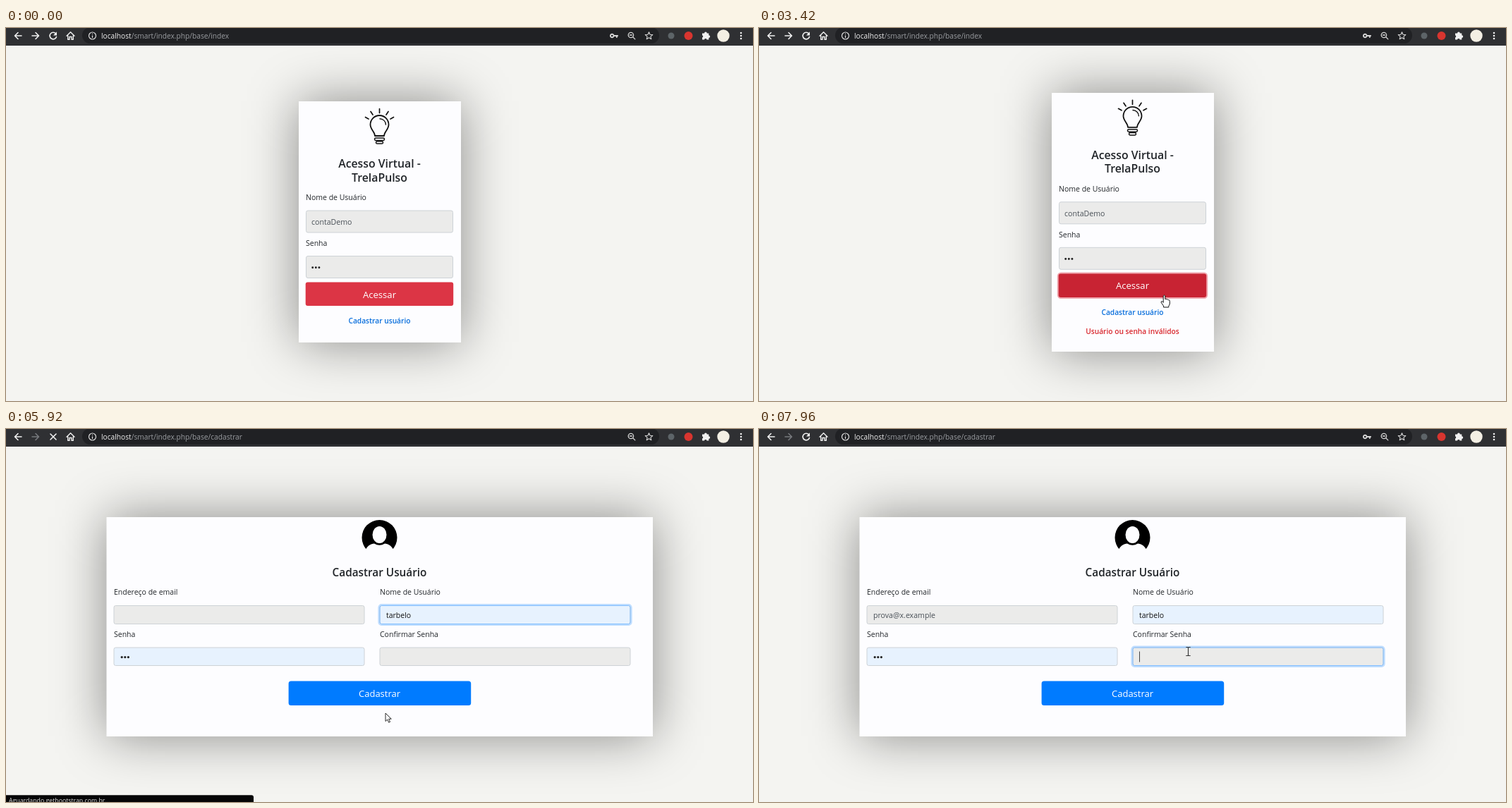
An HTML page for the animation above (8000 ms loop, 1059 by 529 pixels).

```html
<!DOCTYPE html>
<html lang="pt-BR">
<head>
<meta charset="utf-8">
<title>Acesso Virtual</title>
<style>
html, body { margin: 0; width: 100%; height: 100%; overflow: hidden; background: #f4f4f1; }
svg { display: block; width: 1059px; height: 529px; font-family: "Open Sans", "Noto Sans", sans-serif; }
.line { fill: none; stroke-linecap: round; stroke-linejoin: round; }
.bold { font-weight: 600; }
.mid { text-anchor: middle; }
</style>
</head>
<body>
<svg id="stage" viewBox="0 0 1059 529"></svg>
<script>
const LOOP = 8000;
const CLICK_LOGIN = 2830, ERROR = 3250, CLICK_LINK = 4500, NAVIGATE = 4800,
      LOADED = 5850, IDLE = 6050, CLICK_EMAIL = 6380, TYPE = 6620, CLICK_CONFIRM = 7790;
const EMAIL = 'prova@x.example';

// [time, x, y] of the pointer's hot spot
const PATH = [
  [60, 1000, 14], [840, 612, 352], [1000, 580, 374], [1130, 576, 376], [2700, 574.5, 379],
  [3480, 574.5, 379], [3900, 536.5, 404], [4340, 536.5, 404], [4800, 540, 404],
  [5900, 540, 404], [6340, 241.5, 254.5], [7300, 241.5, 254.5], [7640, 608.5, 315.5], [LOOP, 608.5, 315.5]
];
const POINTERS = [
  [60, 'arrow'], [880, 'hand'], [3600, 'arrow'], [3740, 'hand'], [NAVIGATE, 'arrow'],
  [6240, 'beam'], [7380, 'arrow'], [7560, 'beam']
];

const text = (x, y, size, fill, str, cls = '', id = '') =>
  `<text id="${id}" x="${x}" y="${y}" font-size="${size}" fill="${fill}" class="${cls}">${str}</text>`;
const rect = (x, y, w, h, r, attrs) =>
  `<rect x="${x}" y="${y}" width="${w}" height="${h}" rx="${r}" ${attrs}/>`;
const line = (d, color, width = 1.6, id = '') =>
  `<path id="${id}" class="line" d="${d}" stroke="${color}" stroke-width="${width}"/>`;
const disc = (x, y, r, fill) => `<circle cx="${x}" cy="${y}" r="${r}" fill="${fill}"/>`;
const dots = (x, y, r) => [0, 4.6, 9.2].map(d => disc(x + d, y, r, '#222')).join('');
const label = (x, y, str) => text(x, y, 10.5, '#212529', str);
const field = (x, y, w, h, fill) => rect(x + .5, y + .5, w - 1, h - 1, 2.5, `fill="${fill}" stroke="#cdd2d6"`);
const focusRing = (id, x, y, w, h) => `<g id="${id}" fill="none">
  ${rect(x - 1, y - 1, w + 2, h + 2, 4, 'stroke="#007bff" stroke-opacity=".25" stroke-width="2.2"')}
  ${rect(x + .5, y + .5, w - 1, h - 1, 2.5, 'stroke="#80bdff"')}</g>`;
const card = (id, x, y, w, h) => `<g id="${id}">
  ${rect(x, y, w, h, 0, 'fill="#000" fill-opacity=".44" style="filter:blur(36px)"')}
  ${rect(x, y, w, h, 0, 'fill="#fdfdff"')}</g>`;

const bulb = line('M523 153C523 147 516.5 144 516.5 137A13 13 0 1 1 542.5 137C542.5 144 536 147 536 153Z', '#111', 1.8)
  + line('M530 128.7A8.4 8.4 0 0 1 538.4 137', '#111', 1.4)
  + line('M529.5 114.5V120.5M517 118.5L520 123M542 118.5L539 123M509.5 126.5L514 129M549.5 126.5L545 129', '#111', 1.7)
  + rect(522.5, 156, 14, 3.4, 1.7, 'class="line" stroke="#111" stroke-width="1.5"')
  + rect(524.5, 160.7, 10, 3.4, 1.7, 'class="line" stroke="#111" stroke-width="1.5"');

const person = disc(529.5, 154, 25, '#000')
  + '<ellipse cx="529.5" cy="150" rx="10" ry="12" fill="#fdfdff"/>'
  + '<path d="M504 181V171H510C512 166 517 163 522 162.5Q529.5 167 537 162.5C542 163 547 166 549 171H555V181Z" fill="#fdfdff"/>';

const loginPage = `<g id="login">
  ${card('cardPlain', 415, 104, 230, 342)}
  ${card('cardError', 415, 92, 230, 367)}
  <g id="form">
    ${bulb}
    ${text(529.5, 198, 15.8, '#212529', 'Acesso Virtual -', 'bold mid')}
    ${text(529.5, 217.5, 15.8, '#212529', 'TrelaPulso', 'bold mid')}
    ${label(425, 244, 'Nome de Usuário')}
    ${field(425, 258.5, 209, 32, '#ebebea')}
    ${text(433, 279, 10.6, '#495057', 'contaDemo')}
    ${label(425, 309, 'Senha')}
    ${field(425, 323, 209, 32, '#ebebea')}
    ${dots(434.7, 339.7, 1.45)}
    ${rect(424, 360, 211, 35, 4, 'id="loginRing" fill="none" stroke="#e15361" stroke-opacity=".5" stroke-width="2.4"')}
    ${rect(424.7, 360.6, 209.5, 33.5, 3, 'id="loginButton"')}
    ${text(529.5, 382.5, 13.1, '#fff', 'Acessar', 'mid')}
    ${text(529.5, 419, 10.2, '#0a6fdc', 'Cadastrar usuário', 'bold mid', 'link')}
    ${text(529.5, 446.5, 10.2, '#d9292f', 'Usuário ou senha inválidos', 'bold mid', 'error')}
  </g>
</g>`;

const registerPage = `<g id="register">
  ${card('cardRegister', 142.5, 125, 774.5, 311)}
  ${person}
  ${text(529.5, 208.5, 15.3, '#212529', 'Cadastrar Usuário', 'bold mid')}
  ${label(153, 235, 'Endereço de email')}
  ${label(530, 235, 'Nome de Usuário')}
  ${field(152.5, 250, 356, 27, '#ebebea')}
  ${field(529.5, 250, 356, 27, '#e7f2fe')}
  ${text(162, 268, 10.6, '#495057', '', '', 'email')}
  ${text(539, 268, 10.5, '#111', 'tarbelo')}
  ${label(153, 295, 'Senha')}
  ${label(530, 295, 'Confirmar Senha')}
  ${field(152.5, 309.5, 356, 26.5, '#e7f2fe')}
  ${field(529.5, 309.5, 356, 26.5, '#ebebea')}
  ${dots(164.2, 323.6, 1.6)}
  ${focusRing('userRing', 529.5, 250, 356, 27)}
  ${focusRing('emailRing', 152.5, 250, 356, 27)}
  ${focusRing('confirmRing', 529.5, 309.5, 356, 26.5)}
  ${rect(0, 0, 1, 15, 0, 'id="caret" fill="#444"')}
  ${rect(400.6, 357.6, 258.6, 34.4, 3.5, 'fill="#007bff"')}
  ${text(529.5, 380, 13, '#fff', 'Cadastrar', 'mid')}
</g>`;

const star = Array.from({ length: 10 }, (_, i) => {
  const a = i * Math.PI / 5, r = i % 2 ? 2.5 : 5.6;
  return `${i ? 'L' : 'M'}${(911.5 + r * Math.sin(a)).toFixed(1)} ${(11.3 - r * Math.cos(a)).toFixed(1)}`;
}).join('') + 'Z';

const toolbar = rect(0, 0, 1059, 25, 0, 'fill="#2f3033"')
  + rect(108, -1, 818, 23, 11.5, 'fill="#202124"')
  + line('M22 11H12.5M17 6.5L12.5 11L17 15.5', '#f1f1f1')
  + line('M37 11H46.5M42 6.5L46.5 11L42 15.5', '#f1f1f1', 1.6, 'forward')
  + `<g id="reload">${line('M70.6 8A4.8 4.8 0 1 0 71.5 12.5', '#f1f1f1')}<path d="M72 5.3V10.4H67Z" fill="#f1f1f1"/></g>`
  + line('M63 7L71 15M71 7L63 15', '#f1f1f1', 1.6, 'stop')
  + line('M86 11.2L91.5 5.8L97 11.2M87.7 10.5V16.3H90V12.5H93V16.3H95.3V10.5', '#f1f1f1', 1.4)
  + line('M127.5 11A5 5 0 1 1 117.5 11A5 5 0 1 1 127.5 11M122.5 10.8V13.6M122.5 8.4V8.5', '#e0e0e0', 1.2)
  + `<text y="14.8" x="135" font-size="10.2" fill="#9a9da1"><tspan fill="#f0f0f0">localhost</tspan>/smart/index.php/base/<tspan id="route"></tspan></text>`
  + `<g id="key">${line('M861.5 11A2.3 2.3 0 1 1 856.9 11A2.3 2.3 0 1 1 861.5 11', '#d5d5d5', 1.9)}${line('M862 11H867M865.8 11V13', '#d5d5d5', 2)}</g>`
  + line('M889.6 10A3.7 3.7 0 1 1 882.2 10A3.7 3.7 0 1 1 889.6 10M888.7 12.8L891.8 15.9M884.4 10H887.4', '#d5d5d5', 1.3)
  + line(star, '#d5d5d5', 1.1)
  + disc(943, 11, 4.5, '#5d6468') + disc(967.5, 11, 6, '#d8352f')
  + '<path d="M987 7.5H990A1.9 1.9 0 0 1 993.8 7.5H996.3V10.2A1.9 1.9 0 0 1 996.3 14V16.5H993.5A1.8 1.8 0 0 0 990 16.5H987V13.6A1.8 1.8 0 0 0 987 10.2Z" fill="#f1f1f1"/>'
  + disc(1017, 11, 8.7, '#f3efe4')
  + [7, 11, 15].map(y => disc(1042, y, 1.3, '#f1f1f1')).join('');

const status = `<g id="status">${rect(-5, 519.3, 0, 20, 3, 'id="statusBox"')}
  ${text(4, 530.3, 8.75, '#dcdcdc', '', '', 'statusText')}</g>`;

const pointers = `<g id="pointer">
  <path id="arrow" d="M0 0V11.5L2.7 9L4.6 13.2L6.5 12.3L4.7 8.2H8.2Z" fill="#fff" stroke="#111" stroke-width=".9"/>
  <path id="hand" d="M-1.3 1Q0 -1 1.3 1V5.5Q2.8 4.6 3.8 6Q5.3 5.4 6 6.8Q7.8 6.5 7.8 8.4V12Q7.3 14.4 6.3 15.2V17H-1V15.2L-4.4 10.2Q-4.6 8.2 -2.8 8.8L-1.3 10.3Z" fill="#fff" stroke="#111"/>
  <path id="beam" class="line" d="M-2.8 -6H-.8L0 -5.4L.8 -6H2.8M0 -5.4V5.4M-2.8 6H-.8L0 5.4L.8 6H2.8" stroke="#333" stroke-width="1.1"/>
</g>`;

document.getElementById('stage').innerHTML =
  rect(0, 0, 1059, 529, 0, 'fill="#f4f4f1"') + loginPage + registerPage + toolbar + status + pointers;

const $ = id => document.getElementById(id);
const set = (id, attrs) => { for (const k in attrs) $(id).setAttribute(k, attrs[k]); };
const show = (id, on) => set(id, { display: on ? 'inline' : 'none' });
const write = (id, str) => { if ($(id).textContent !== str) $(id).textContent = str; };
const clamp = v => Math.max(0, Math.min(1, v));
const fade = (t, start) => clamp((t - start) / 150);
const mix = (a, b, k) => a.map((v, i) => v + (b[i] - v) * k);

function pointerAt(t) {
  const i = PATH.findIndex(p => p[0] > t);
  if (i < 1) return PATH[0].slice(1);
  const [a, b] = [PATH[i - 1], PATH[i]], k = (t - a[0]) / (b[0] - a[0]);
  return mix(a.slice(1), b.slice(1), k * k * (3 - 2 * k));
}

function drawLogin(t) {
  const failed = t >= ERROR;
  show('cardPlain', !failed);
  show('cardError', failed);
  show('error', failed);
  set('form', { transform: `translate(0 ${failed ? -12.2 : 0})` });

  const normal = [220, 53, 69], hover = [200, 35, 51], pressed = [189, 33, 48];
  let color = mix(normal, hover, fade(t, 880) - fade(t, CLICK_LINK));
  color = mix(color, pressed, clamp((t - CLICK_LOGIN) / 50) - fade(t, CLICK_LOGIN + 110));
  set('loginButton', { fill: `rgb(${color.map(Math.round)})` });
  set('loginRing', { opacity: fade(t, CLICK_LOGIN) - fade(t, CLICK_LINK) });

  const over = t >= 3740;
  set('link', { fill: over ? '#0056b3' : '#0a6fdc', 'text-decoration': over ? 'underline' : 'none' });
}

function drawRegister(t) {
  write('email', EMAIL.slice(0, Math.max(0, Math.floor((t - TYPE) / 46))));
  const toEmail = fade(t, CLICK_EMAIL), toConfirm = fade(t, CLICK_CONFIRM);
  set('userRing', { opacity: 1 - toEmail });
  set('emailRing', { opacity: toEmail - toConfirm });
  set('confirmRing', { opacity: toConfirm });

  const confirm = t >= CLICK_CONFIRM, typed = TYPE + 46 * EMAIL.length;
  const since = confirm ? t - CLICK_CONFIRM : t > typed ? t - typed : 0;
  show('caret', t >= CLICK_EMAIL && since % 1000 < 500);
  set('caret', confirm ? { x: 539, y: 315.5 } : { x: 162 + $('email').getComputedTextLength(), y: 256 });
}

function drawBrowser(t) {
  const left = t >= NAVIGATE, loading = left && t < IDLE;
  write('route', left ? 'cadastrar' : 'index');
  set('forward', { stroke: left ? '#77797d' : '#f1f1f1' });
  show('reload', !loading);
  show('stop', loading);
  show('key', !left || t >= IDLE);
  show('status', t >= 3900 && t < IDLE);
  set('statusBox', { width: left ? 356 : 185, fill: left ? '#060607' : '#1f2023' });
  write('statusText', left ? 'Aguardando getbootstrap.com.br...' : 'localhost/smart/index.php/base/cadastrar');
}

function draw(t) {
  const registering = t >= LOADED;
  show('login', !registering);
  show('register', registering);
  registering ? drawRegister(t) : drawLogin(t);
  drawBrowser(t);

  const kind = (POINTERS.filter(p => p[0] <= t).pop() || [])[1];
  for (const id of ['arrow', 'hand', 'beam']) show(id, id === kind);
  set('pointer', { transform: `translate(${pointerAt(t)})` });
}

function tick() {
  draw(performance.now() % LOOP);
  requestAnimationFrame(tick);
}
tick();
</script>
</body>
</html>
```
